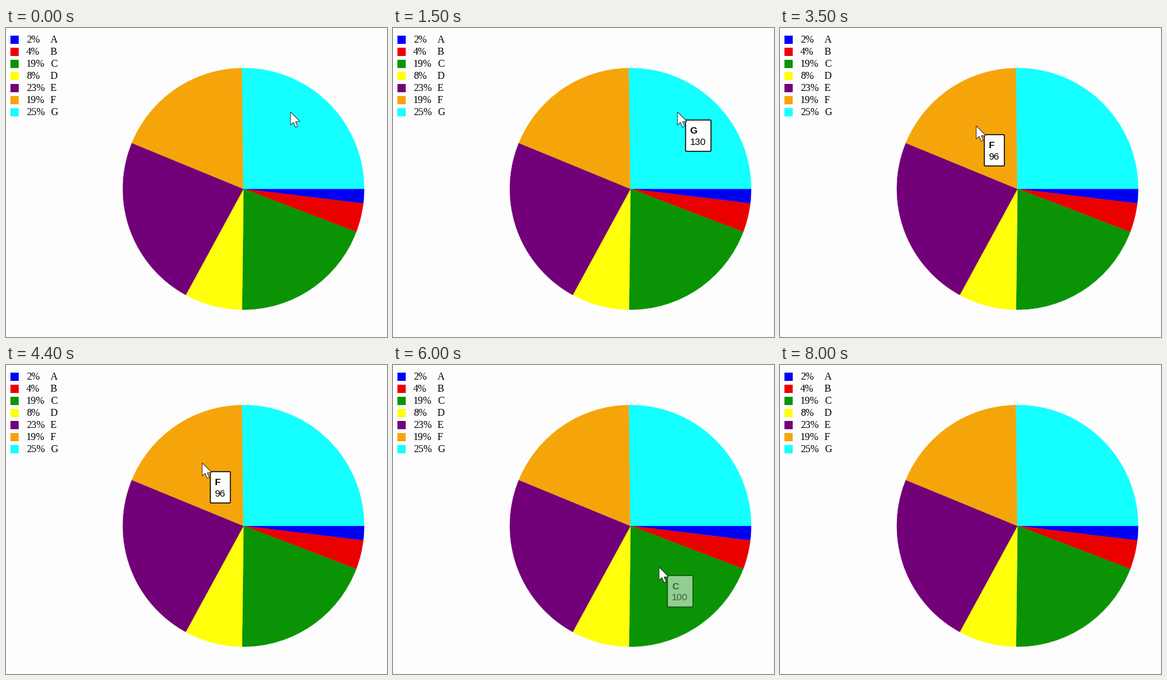
A matplotlib script for the animation above (8100 ms loop, 600 by 486 pixels).

```python
import matplotlib.pyplot as plt
import numpy as np
from matplotlib.animation import FuncAnimation
from matplotlib.patches import FancyBboxPatch, Polygon, Rectangle, Wedge

W, H, DPI = 600, 486, 100
FRAMES, STEP = 81, 100
PT = 72 / DPI
CENTER, RADIUS = (374, 253), 190

SLICES = [
    ("A", 10, "#0000f5"),
    ("B", 20, "#eb0000"),
    ("C", 100, "#0a9405"),
    ("D", 40, "#ffff0a"),
    ("E", 120, "#720078"),
    ("F", 96, "#f5a50a"),
    ("G", 130, "#14ffff"),
]
TOTAL = sum(value for _, value, _ in SLICES)

# Pointer waypoints: time in ms, x, y
PATH = np.array([
    (0, 448, 132), (1800, 448, 132), (2200, 328, 151), (2300, 324, 152),
    (2500, 309, 154), (4600, 309, 154), (5200, 419, 318), (7000, 419, 318),
    (7500, 576, 46),
])
POINTER_EXIT = 7500
ARROW = np.array([(0, 0), (0, 20.5), (4.6, 16.4), (8, 24.2),
                  (11.2, 22.8), (8, 15.4), (15, 15)])

# Tooltips: label, value, box corner, fade-in start, fade-out start
TIPS = [
    ("G", 130, (460.7, 144.7), 600, 1800),
    ("F", 96, (321.7, 167.7), 3000, 4600),
    ("C", 100, (432.2, 331.2), 5750, 7000),
]
FADE_IN, FADE_OUT = 450, 300

fig = plt.figure(figsize=(W / DPI, H / DPI), dpi=DPI, facecolor="#fefdfe")
ax = fig.add_axes([0, 0, 1, 1])
ax.set(xlim=(0, W), ylim=(H, 0))
ax.axis("off")


def label(x, y, text, size, font, **style):
    return ax.text(x, y, text, fontsize=size * PT, family=font,
                   va="baseline", **style)


def draw_chart():
    angle = 0
    for i, (name, value, color) in enumerate(SLICES):
        sweep = 360 * value / TOTAL
        ax.add_patch(Wedge(CENTER, RADIUS, angle, angle + sweep,
                           facecolor=color, edgecolor=color, linewidth=0.3))
        angle += sweep
        y = 12 + 19 * i
        ax.add_patch(Rectangle((7, y), 13, 13, facecolor=color, linewidth=0))
        label(32, y + 11, f"{100 * value / TOTAL:.0f}%", 16, "Liberation Serif")
        label(70, y + 11, name, 16, "Liberation Serif")


def make_tip(name, value, corner):
    x, y = corner
    width = 15 + 8.34 * len(str(value))
    box = FancyBboxPatch((x, y), width, 49.3, facecolor="white",
                         edgecolor="black", linewidth=1.5 * PT, zorder=5,
                         boxstyle="round,pad=0,rounding_size=1.5")
    ax.add_patch(box)
    return [
        box,
        label(x + 7, y + 21.3, name, 15, "Liberation Sans",
              weight="bold", zorder=6),
        label(x + 7, y + 39, str(value), 15, "Liberation Sans", zorder=6),
    ]


def tip_alpha(t, start, end):
    return float(np.interp(t, [start, start + FADE_IN, end, end + FADE_OUT],
                           [0, 1, 1, 0]))


draw_chart()
tips = [(make_tip(*tip[:3]), tip[3:]) for tip in TIPS]
pointer = ax.add_patch(Polygon(ARROW, closed=True, facecolor="white",
                               edgecolor="#202020", linewidth=0.9 * PT,
                               joinstyle="miter", zorder=8))


def update(frame):
    t = frame * STEP
    x, y = (np.interp(t, PATH[:, 0], PATH[:, k]) for k in (1, 2))
    pointer.set_xy(ARROW + (x, y))
    pointer.set_visible(t < POINTER_EXIT)
    for parts, span in tips:
        alpha = tip_alpha(t, *span)
        for part in parts:
            part.set_alpha(alpha)
            part.set_visible(alpha > 0)
    return [pointer] + [part for parts, _ in tips for part in parts]


animation = FuncAnimation(fig, update, frames=FRAMES, interval=STEP,
                          repeat=True, repeat_delay=0)
plt.show()
```
